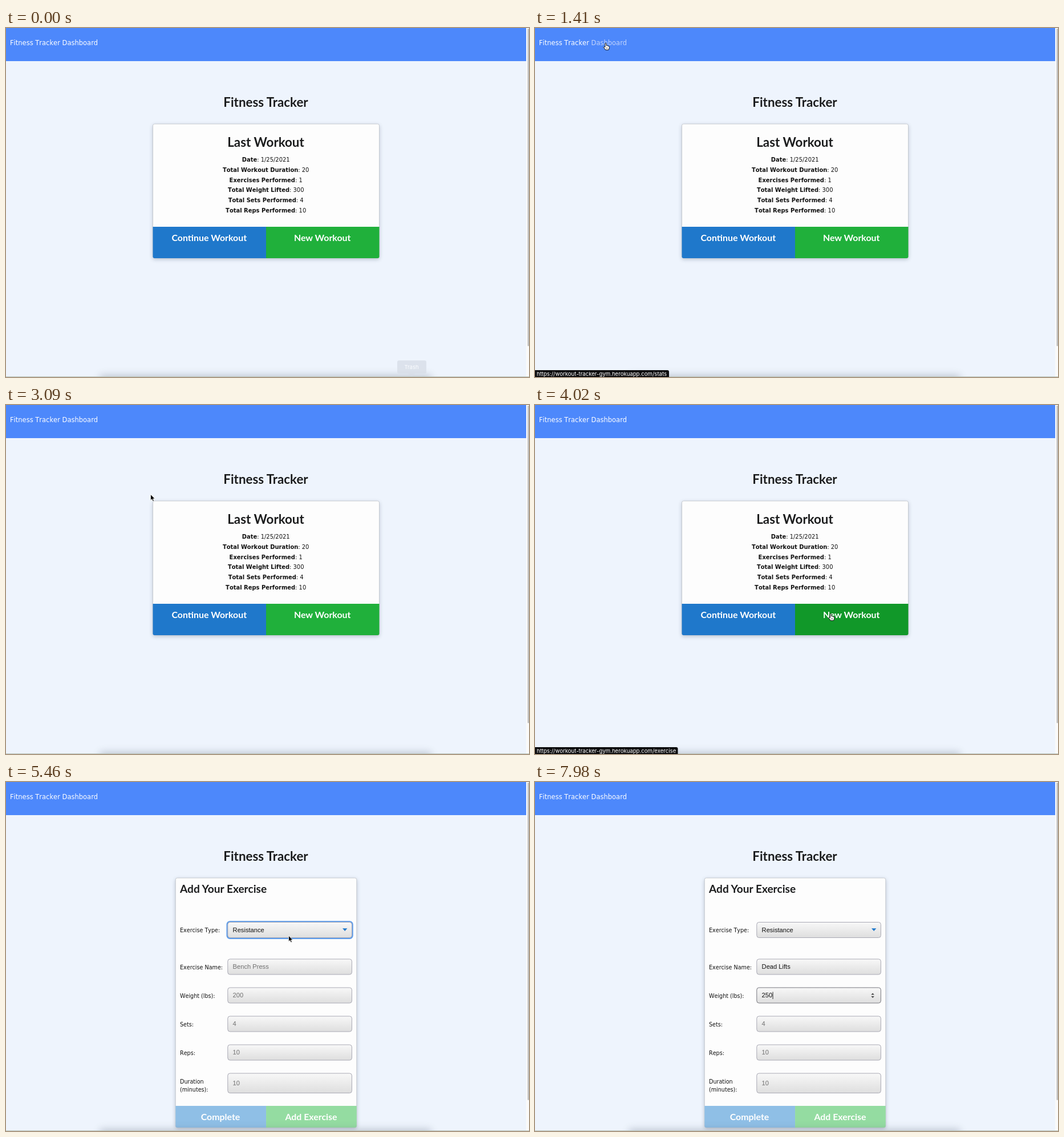
These frames come from a looping animation (917x611 px, 8000 ms). An HTML page:

```html
<!DOCTYPE html>
<html lang="en">
<head>
<meta charset="utf-8">
<title>Fitness Tracker</title>
<style>
  html, body { margin: 0; width: 100%; height: 100%; overflow: hidden; background: #fdfdfd; }
  svg { display: block; width: 100%; height: 100%; }
  text { white-space: pre; fill: #111; }
  .v { font-family: "DejaVu Sans", sans-serif; font-kerning: none; }
  .l { font-family: Lato, sans-serif; font-weight: 700; fill: #1b1c1d; }
  .a { font-family: "Liberation Sans", Arial, sans-serif; }
  .c { font-family: "Liberation Sans", Arial, sans-serif; font-size: 9.55px; fill: #4d4d4d; }
  .s { font-family: Inter, sans-serif; }
  .m { text-anchor: middle; }
  .e { text-anchor: end; }
  .b { font-weight: 700; }
  .w { fill: #fff; }
  .p { fill: #707070; }
</style>
</head>
<body>
<svg id="stage" viewBox="0 0 917 611" xmlns="http://www.w3.org/2000/svg">
  <defs>
    <linearGradient id="field" x1="0" y1="0" x2="0" y2="1">
      <stop offset="0" stop-color="#f8f8f8"/><stop offset="1" stop-color="#dedede"/>
    </linearGradient>
    <filter id="soft" x="-20%" y="-20%" width="140%" height="140%"><feGaussianBlur stdDeviation="3.5"/></filter>
    <filter id="wide" x="-10%" y="-200%" width="120%" height="500%"><feGaussianBlur stdDeviation="7"/></filter>
    <clipPath id="plot"><rect x="490" y="171" width="345" height="70"/></clipPath>
  </defs>
  <g id="home"></g>
  <g id="dash"></g>
  <g id="form"></g>
  <g id="over"></g>
</svg>
<script>
const LOOP = 8000;
const DASH_AT = 1420, CHART_AT = 1500, HOME_AT = 2690, FORM_AT = 4340;
const MENU_AT = 4880, PICK_AT = 5260, NAME_AT = 6030, TYPE_AT = 6250, WEIGHT_AT = 7340;
const HOST = 'https://workout-tracker-gym.herokuapp.com/';
const BLUE = '#4d88fb', LINK_HOVER = '#c3d4fc';

const $ = id => document.getElementById(id);
const clamp = (v, a = 0, b = 1) => Math.min(b, Math.max(a, v));
const range = n => [...Array(n).keys()];
const rect = (x, y, w, h, fill, extra = '') =>
  `<rect x="${x}" y="${y}" width="${w}" height="${h}" fill="${fill}" ${extra}/>`;
const text = (x, y, str, cls, size, extra = '') =>
  `<text x="${x}" y="${y}" class="${cls}" ${size ? `font-size="${size}"` : ''} ${extra}>${str}</text>`;
const path = (d, extra) => `<path d="${d}" ${extra}/>`;

// Page frame shared by the home page and the form
function page(hover) {
  return rect(0, 0, 917, 611, '#eef4fd') + rect(0, 0, 912, 58, BLUE) +
    rect(912, 0, 5, 611, '#fafafa') + rect(914.5, 1, 2.5, 556, '#bfbfbf', 'rx="1.2"') +
    text(7, 30, `Fitness Tracker <tspan fill="${hover ? LINK_HOVER : '#fff'}">Dashboard</tspan>`, 'v w', 11.5) +
    text(455.5, 138, 'Fitness Tracker', 'l m', 22.3);
}

function card(x, y, w, h, split, left, right) {
  const b = y + h, mid = x + w / 2;
  return rect(x, y + 2, w, h, '#35435c', 'rx="3" opacity=".3" filter="url(#soft)"') +
    rect(x, y, w, h, '#fdfdfd', 'rx="3" stroke="#bfc3ca" stroke-width=".8"') +
    path(`M${x} ${split}H${mid}V${b}H${x + 3}Q${x} ${b} ${x} ${b - 3}Z`, `fill="${left}"`) +
    path(`M${mid} ${split}H${x + w}V${b - 3}Q${x + w} ${b} ${x + w - 3} ${b}H${mid}Z`, `fill="${right}"`);
}

const stats = [['Date', '1/25/2021'], ['Total Workout Duration', 20], ['Exercises Performed', 1],
  ['Total Weight Lifted', 300], ['Total Sets Performed', 4], ['Total Reps Performed', 10]];

function home(t) {
  const dashHover = t > 1010 && t < DASH_AT, newHover = t > 3760;
  return page(dashHover) +
    card(257.5, 168, 397, 235, 348, '#1f78cb', newHover ? '#119829' : '#20b03b') +
    text(455.5, 208, 'Last Workout', 'l m', 22.3) +
    stats.map(([k, v], i) =>
      text(455.7, 234.3 + 17.7 * i, `<tspan class="b">${k}</tspan>: ${v}`, 'v m', 9.95)).join('') +
    text(356.3, 373, 'Continue Workout', 'l m w', 15.9) +
    text(554.7, 373, 'New Workout', 'l m w', 15.9);
}

// Dashboard
const days = ['Tuesday', 'Wednesday', 'Thursday', 'Friday', 'Saturday', 'Sunday', 'Monday'];
const minutes = [25, 25, 20, 20, 30, 20, 20];
const pounds = [185, 0, 285, 300, 300, 300, 300];
const shades = ['#00364f', '#2a4070', '#5a4788', '#94438c', '#d0447a', '#f95360', '#ff7238'];
const barColors = ['255,99,132', '54,162,235', '255,206,86', '75,192,192', '153,102,255', '255,159,64'];
const grid = (d, dark) => path(d, `stroke="${dark ? '#b5b5c0' : '#dcdce8'}" stroke-width=".8" fill="none"`);

function lineChart(k) {
  const top = 171.5, base = 236, x = i => 134 + 51.5 * i;
  let out = '';
  for (let i = 0; i < 6; i++) {
    const y = top + 12.9 * i;
    out += grid(`M128 ${y}H443`, i === 5) + text(126, y + 3.3, 30 - 2 * i, 'c e');
  }
  days.forEach((d, i) => {
    out += grid(`M${x(i)} ${top}V242`, i === 0) +
      text(x(i), 247, d, 'c e', 0, `transform="rotate(-16 ${x(i)} 247)"`);
  });
  const pts = minutes.map((m, i) => [x(i), base - (m - 20) * 6.45 * k]);
  const ctrl = pts.map((c, i) => {
    const p = pts[i - 1] || c, n = pts[i + 1] || c;
    const a = Math.hypot(c[0] - p[0], c[1] - p[1]), b = Math.hypot(n[0] - c[0], n[1] - c[1]);
    const at = f => [c[0] + f * (n[0] - p[0]), clamp(c[1] + f * (n[1] - p[1]), top, base)];
    return { before: at(-0.4 * a / (a + b)), after: at(0.4 * b / (a + b)) };
  });
  const d = pts.map((p, i) => i ? `C${ctrl[i - 1].after} ${ctrl[i].before} ${p}` : `M${p}`).join('');
  return out + path(d, 'fill="none" stroke="#e60012" stroke-width="2.2"') +
    pts.map(p => `<circle cx="${p[0]}" cy="${p[1]}" r="2.7" fill="#f00008"/>`).join('') +
    rect(191, 154, 34, 11, '#ff0000') + text(229, 163, 'Workout Duration In Minutes', 'c');
}

function barChart(k) {
  const base = 240, x = i => 502 + 46.6 * i;
  let out = text(652, 138.3, 'Pounds Lifted', 'c b m') +
    rect(617.5, 155, 32, 9, 'rgba(255,99,132,.2)', 'stroke="#e8698a"') + text(654, 163, 'Pounds', 'c');
  for (let i = 0; i < 7; i++) {
    const y = 171.5 + 11.42 * i;
    out += grid(`M496 ${y}H828`, i === 6) + text(494.5, y + 3.3, 300 - 50 * i, 'c e');
  }
  range(8).forEach(i => out += grid(`M${x(i)} 171.5V246`, i === 0));
  days.forEach((d, i) => {
    const cx = x(i) + 24;
    out += text(cx + 2, 251, d, 'c e', 0, `transform="rotate(-31 ${cx + 2} 251)"`);
    if (!pounds[i]) return;
    const y = base - pounds[i] * 0.229 * k, rgb = barColors[i];
    out += path(`M${cx - 17} ${base}V${y}H${cx + 16}V${base}`, `clip-path="url(#plot)" fill="${
      rgb ? `rgba(${rgb},.22)` : 'rgba(0,0,0,.14)'}" stroke="${rgb ? `rgb(${rgb})` : '#cfcfcf'}"`);
  });
  return out;
}

const legend = [[140, 340, 'Push Press'], [232.5, 340, 'Running'], [312, 340, 'Bench Press'],
  [177, 356, 'Quad Press'], [271, 356, 'Military Press']];

function pie(cx, data, hole, k) {
  const total = data.reduce((a, b) => a + b), cy = 418;
  const at = (a, f) => `${cx + 52.8 * f * Math.sin(a)} ${cy - 49 * f * Math.cos(a)}`;
  const arc = (f, sweep, end) => `A${52.8 * f} ${49 * f} 0 0 ${sweep} ${end}`;
  let a = 0;
  const slices = data.map((v, i) => {
    const b = a + v / total * 2 * Math.PI * k;
    const d = `M${at(a, hole)}L${at(a, 1)}${arc(1, 1, at(b, 1))}L${at(b, hole)}` +
      (hole ? arc(hole, 0, at(a, hole)) : '') + 'Z';
    a = b;
    return v ? path(d, `fill="${shades[i]}" stroke="#fff" stroke-width="1.7"`) : '';
  }).join('');
  const dx = cx - 271.3;
  return text(cx, 318.3, 'Exercises Performed', 'c b m') + legend.map(([x, y, name], i) =>
    rect(x + dx, y - 4.5, 32, 9, shades[i]) + text(x + dx + 36.8, y + 3.3, name, 'c')).join('') + slices;
}

function dash(t) {
  const k = 1 - (1 - clamp((t - CHART_AT) / 1000)) ** 4;
  let out = rect(0, 0, 917, 611, '#fdfdfd') + rect(0, 0, 917, 58, BLUE) +
    text(7, 33, 'Fitness Tracker', 'v', 13.1, `style="fill:${t > 2120 ? LINK_HOVER : '#fff'}"`) +
    text(461.5, 102, 'Workout Dashboard', 'v m', 27.7);
  if (t >= CHART_AT) {
    out += lineChart(k) + barChart(k) + pie(271.3, minutes, 0, k) + pie(652.2, pounds, 0.515, k);
  }
  return out;
}

// Exercise form
function field(y, h, str, empty, focus) {
  return rect(388.8, y, 217.6, h, 'url(#field)', `rx="4" stroke="${focus ? '#77777f' : '#a9a9b4'}"`) +
    text(397.6, y + h / 2 + 3.9, str, empty ? 'a p' : 'a', 11.15);
}

function form(t) {
  const open = t >= PICK_AT, bottom = open ? 605 : 339, split = bottom - 38;
  const ring = t > MENU_AT && t < NAME_AT;
  const name = 'Dead Lifts'.slice(0, clamp(Math.floor((t - TYPE_AT) / 90), 0, 10));
  const weight = '250'.slice(0, clamp(Math.floor((t - WEIGHT_AT - 60) / 120), 0, 3));
  const onName = t >= NAME_AT && t < WEIGHT_AT, onWeight = t >= WEIGHT_AT;
  const label = (y, str) => text(305, y, str, 'v', 9.6);
  let out = page(false) + card(297.3, 168, 317.5, bottom - 168, split, '#8fbfe6', '#94dca1') +
    text(305, 193.5, 'Add Your Exercise', 'l', 19.1) + label(263, 'Exercise Type:') +
    (ring ? rect(388, 244.7, 219.2, 28.8, 'none', 'rx="4.5" stroke="#5c9ced" stroke-width="3"') : '') +
    field(245.5, 27, open ? 'Resistance' : 'Select Exercise Type') +
    path('M590 256.3h8.4l-4.2 4.8z', 'fill="#1f78cb"') +
    text(376, split + 25, 'Complete', 'l m w', 15.9) + text(535, split + 25, 'Add Exercise', 'l m w', 15.9);
  if (open) {
    out += label(327.5, 'Exercise Name:') + field(310, 27, name || 'Bench Press', !name, onName) +
      label(377.5, 'Weight (lbs):') + field(360, 27, weight || '200', !weight, onWeight) +
      label(427.5, 'Sets:') + field(410, 27, '4', true) +
      label(477.5, 'Reps:') + field(460, 27, '10', true) +
      label(527.5, 'Duration') + label(541.5, '(minutes):') + field(510, 34.5, '10', true);
    if (onWeight) {
      out += path('M589.3 372.4l2.8-3 2.8 3zM589.3 375l2.8 3 2.8-3z', 'fill="#444"');
    }
  }
  return out;
}

function caret(t) {
  if (t < NAME_AT) return;
  const inName = t < WEIGHT_AT, box = $('form').querySelectorAll('text.a')[inName ? 1 : 2];
  const x = 398 + (box.classList.contains('p') ? 0 : box.getComputedTextLength());
  $('form').insertAdjacentHTML('beforeend', rect(x, inName ? 317.5 : 367.5, 0.9, 12.5, '#111'));
}

function menu(t) {
  if (t < MENU_AT || t >= PICK_AT) return '';
  const pick = t > 5030 ? 1 : 0;
  return rect(384, 250, 223, 48, '#35435c', 'rx="4" opacity=".35" filter="url(#soft)"') +
    rect(384, 249, 223, 48, '#f1f1f2', 'rx="4" stroke="#c4c4c8" stroke-width=".6"') +
    rect(387, 252 + 14 * pick, 217, 14, '#3d86f5', 'rx="2.5"') +
    ['Select Exercise Type', 'Resistance', 'Cardio'].map((o, i) =>
      text(398, 262.6 + 14 * i, o, i === pick ? 'a w' : 'a', 10)).join('');
}

function status(t) {
  const show = (from, to, w, route) => {
    const alpha = Math.min(clamp((t - from) / 250), clamp((to - t) / 150));
    return alpha ? `<g opacity="${alpha}">` +
      path('M0 599H247.5Q250.5 599 250.5 602V611H0Z'.replace('247.5', w - 3).replace(/250.5/g, w), 'fill="#0c0c0e"') +
      text(3, 609, HOST + route, 's w', 9.6) + '</g>' : '';
  };
  return show(1160, 1560, 235, 'stats') + show(2250, 2820, 207, '') + show(3700, 4480, 250.5, 'exercise');
}

function dock(t) {
  const a = clamp(0.75 - t / 200);
  return rect(165, 608, 580, 16, '#4a5468', 'opacity=".3" filter="url(#wide)"') +
    rect(0, 610, 917, 1, '#b8c4ba') +
    (a ? `<g opacity="${a}">` + path('M689 582h45q3 0 3 3v17q0 3-3 3h-17l-6 5-6-5h-16q-3 0-3-3v-17q0-3 3-3z', 'fill="#d7dde7"') +
      text(711, 596.5, 'Trash', 's m w', 9.5) + '</g>' : '');
}

// time, x, y of the pointer tip
const moves = [[150, 711, 624], [620, 390, 240], [1030, 124, 26], [1480, 124, 26], [1800, 150, 52],
  [2160, 100, 30], [2660, 100, 30], [3090, 253.5, 156.5], [3760, 512, 360], [3950, 518.5, 365],
  [4400, 518.5, 365], [4800, 488, 259], [4960, 488, 259], [5120, 495.5, 269], [5500, 495.5, 269],
  [5900, 462, 322], [6100, 462, 322]];

function pointer(t) {
  if (t < 150 || t > TYPE_AT) return '';
  let i = moves.findIndex(m => m[0] > t);
  if (i < 0) i = moves.length;
  const a = moves[i - 1], b = moves[i] || a;
  const u = b === a ? 0 : (t - a[0]) / (b[0] - a[0]), e = u * u * (3 - 2 * u);
  const x = a[1] + (b[1] - a[1]) * e, y = a[2] + (b[2] - a[2]) * e;
  const hand = (t > 1010 && t < 1500) || (t > 2120 && t < 2710) || (t > 3760 && t < 4400);
  const beam = t > 5780;
  const shape = hand
    ? path('M-1.1 1.2Q0-.6 1.1 1.2V4.6Q2.6 4 3 5.2 4.4 4.7 4.8 5.9 6.4 5.6 6.4 7.2 6.4 9.8 5 12.3H-.4Q-1.4 10-4 7.7-3.6 5.9-1.1 7.6Z',
        'fill="#fff" stroke="#111" stroke-width="1"') + path('M1.2 8.2V10.4M3 8.2V10.4', 'stroke="#333" stroke-width=".7"')
    : beam ? path('M-2-5Q0-5 0-3.5 0-5 2-5M0-4V4M-2 5Q0 5 0 3.5 0 5 2 5', 'fill="none" stroke="#222" stroke-width=".9"')
    : path('M0 0V10.4L2.4 8.2 4 12 5.9 11.2 4.3 7.6H7.5Z', 'fill="#000" stroke="#fff" stroke-width=".8"');
  return `<g transform="translate(${x} ${y})">${shape}</g>`;
}

function render(t) {
  const scene = t >= FORM_AT ? 'form' : t >= DASH_AT && t < HOME_AT ? 'dash' : 'home';
  const draw = { home, dash, form };
  for (const id in draw) $(id).innerHTML = id === scene ? draw[id](t) : '';
  if (scene === 'form') caret(t);
  $('over').innerHTML = dock(t) + menu(t) + status(t) + pointer(t);
}

const start = performance.now();
function tick() {
  render((performance.now() - start) % LOOP);
  requestAnimationFrame(tick);
}
tick();
</script>
</body>
</html>
```
